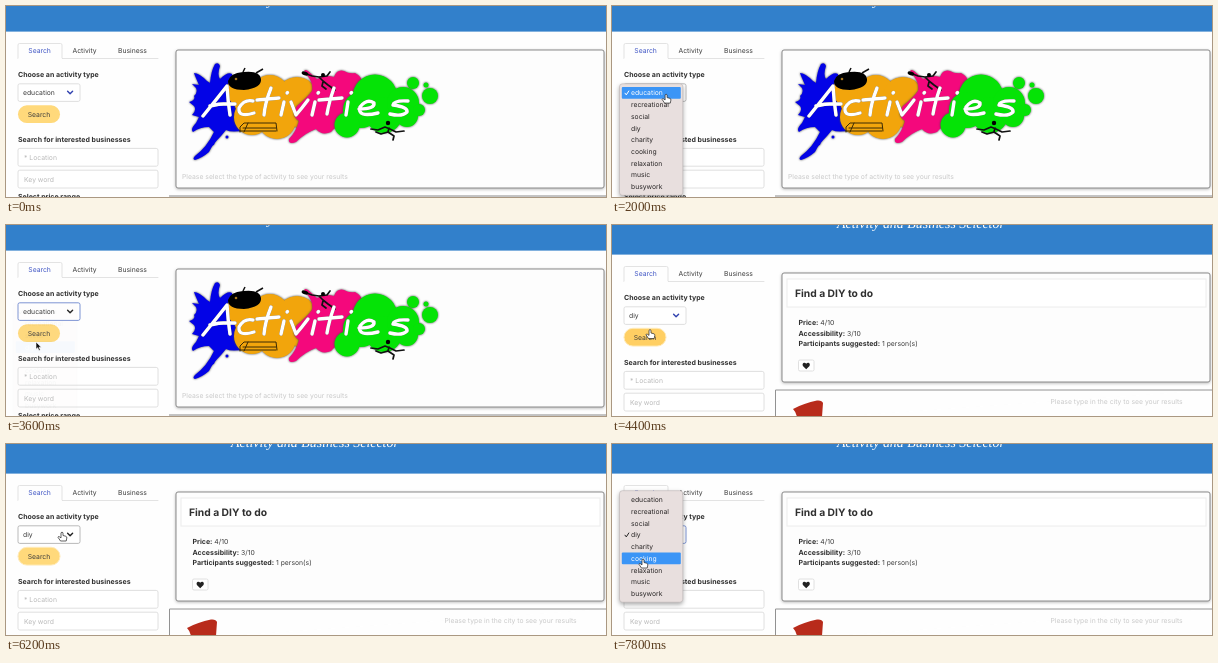
Recreate the animation shown at these times as an HTML page. Size 600 px wide and 191 px high, loop 8000 ms.

```html
<!DOCTYPE html>
<html lang="en">
<head>
<meta charset="utf-8">
<title>Activity and Business Selector</title>
<style>
  html, body { margin: 0; width: 100%; height: 100%; overflow: hidden; background: #fefefe; }
  svg { display: block; width: 600px; height: 191px; }
  text { font: 6.8px Inter, Roboto, sans-serif; fill: #3c3c3c; text-rendering: geometricPrecision; white-space: pre; }
  .bold { font-weight: 700; font-size: 7px; fill: #303030; }
  .title { font-weight: 700; font-size: 10.3px; fill: #303030; }
  .banner { font: italic 13.9px "Liberation Serif", serif; fill: #fff; }
  .hint { fill: #c9c9c9; }
  .placeholder { fill: #b9b9b9; }
  .field { fill: #fff; stroke: #d8d8d8; stroke-width: .8; }
  .card { fill: #fdfdfd; stroke: #8b8b8b; filter: drop-shadow(0 1px 1.5px #0004); }
  .line { fill: none; stroke-linecap: round; stroke-linejoin: round; }
  .blob { filter: drop-shadow(0 0 .8px #444); }
</style>
</head>
<body>
<svg viewBox="0 0 600 191">
  <g id="page">
    <rect y="-10" width="600" height="35.600" fill="#3280cb"/>
    <text class="banner" x="225" y="-.8">Activity and Business Selector</text>

    <path class="line" d="M12 52.5V39q0-1.5 1.5-1.5h41q1.5 0 1.5 1.5v13.5H152" stroke="#dcdcdc" stroke-width=".8"/>
    <path d="M12.5 52.5h43" stroke="#fefefe"/>
    <text x="22.3" y="47" style="fill:#3f55c4">Search</text>
    <text x="66.5" y="47">Activity</text>
    <text x="112" y="47">Business</text>

    <text class="bold" x="12" y="71">Choose an activity type</text>
    <rect id="select" class="field" x="12" y="77.8" width="62" height="17.6" rx="1.8"/>
    <text id="choice" x="17" y="89"></text>
    <path id="chevron" class="line" d="m61.6 85.2 2.5 2.6 2.5-2.6" stroke-width="1.4"/>
    <rect id="button" x="12" y="99.3" width="42" height="17.8" rx="8.9"/>
    <text x="33" y="110.7" text-anchor="middle">Search</text>

    <text class="bold" x="12" y="136">Search for interested businesses</text>
    <rect class="field" x="12" y="142.4" width="140" height="17.8" rx="1.8"/>
    <text class="placeholder" x="18" y="154">* Location</text>
    <rect class="field" x="12" y="164.2" width="140" height="17.8" rx="1.8"/>
    <text class="placeholder" x="18" y="175.8">Key word</text>
    <text class="bold" x="12" y="193">Select price range</text>

    <g id="welcome">
      <rect class="card" x="170" y="44" width="428" height="138" rx="2"/>
      <path d="M163 190H600" stroke="#888"/>
      <g class="blob" fill="#0303e6">
        <path d="M190 82L186 78L193 79Q189 70 188 67Q193 67 201 75L204 77Q205 65 209 58Q213 56 214 60Q211 69 214 73Q222 65 226 68Q226 75 232 78L246 96L240 124Q226 127 220 124L215 130Q206 139 203 146Q196 152 189 154Q186 153 189 150Q201 141 208 126L203 121Q194 121 187 126Q184 123 190 117L193 111L186 109Q191 104 188 100L183 96Q190 94 188 90Q192 87 190 82Z"/>
        <circle cx="206" cy="137" r="2.500"/><circle cx="221" cy="131" r="1.500"/>
      </g>
      <g class="blob" fill="#f2a50c">
        <circle cx="238" cy="85" r="17"/><circle cx="264" cy="88" r="19"/>
        <circle cx="291" cy="91" r="20"/><circle cx="300" cy="105" r="19"/>
        <circle cx="246" cy="111" r="18"/><circle cx="271" cy="114" r="19"/>
        <path d="M224 88h80v25h-70Z"/>
      </g>
      <path class="blob" fill="#f4087c" d="M299 67Q297 62 302 65L311 73Q319 68 328 71Q331 63 338 65Q343 68 349 67Q359 72 355 82Q365 92 355 105Q357 120 343 121Q332 117 325 126Q316 130 310 123Q299 127 290 136Q282 139 283 133Q290 126 293 115Q284 109 291 100Q301 92 306 85Q308 76 299 67Z"/>
      <g class="blob" fill="#05e306">
        <circle cx="369" cy="91" r="22.500"/><circle cx="355" cy="104" r="18"/>
        <circle cx="341" cy="119" r="12.500"/><circle cx="378" cy="109" r="18"/>
        <circle cx="397" cy="97" r="16"/><circle cx="401" cy="110" r="11"/>
        <circle cx="407" cy="77" r="6"/><circle cx="424" cy="90" r="8"/>
        <circle cx="413" cy="104" r="6"/><circle cx="420" cy="79" r="2.500"/>
      </g>
      <g id="silhouettes">
        <path d="M222 75Q224 67 237 66Q254 64 255 73Q256 82 238 84Q222 84 222 75Z"/>
        <path d="m250 67 7-4M237 66l2-4" stroke="#111" stroke-width="1.500"/>
        <circle cx="230" cy="73" r="1.300" fill="#a67620"/>
        <path class="line" d="m298 67 8 3 7 1 4 4 5 4 7 5m-12-8-1 4 4 3m-7-12 8-1 3-4" stroke="#111" stroke-width="1.700"/>
        <ellipse cx="299" cy="67.500" rx="3.500" ry="1.800" transform="rotate(18 299 67.5)"/>
        <circle cx="317" cy="69" r="2"/>
        <path class="line" d="m365 123 7 1 7-3 5 2 6 3 8-1m-15-3-1 4 6 4-1 4m-5-8-7 2-5-2" stroke="#111" stroke-width="1.700"/>
        <circle cx="382" cy="117" r="2.200"/>
        <path class="line" d="M234 126v-5l4-4h32l1 8m-37 0h36m-33-3h33m-28-5-4 9" stroke="#3b2a05"/>
      </g>
      <g class="line" aria-label="Activities" stroke="#fff" stroke-width="3.400" style="filter:drop-shadow(0 0 .5px #555)">
        <path d="M197 110Q210 94 221 80Q222 96 224 109M204 100Q215 97 229 98"/>
        <path d="M247 95Q238 93 233 102Q232 112 248 107"/>
        <path d="M265 82Q259 97 258 109M251 94L273 92"/>
        <path d="M278 96L275 109M281 87l.5-.5"/>
        <path d="M285 96L290 109Q296 102 302 94"/>
        <path d="M309 96L306 109M312 87l.5-.5"/>
        <path d="M328 82Q323 96 321 108M313 94L336 92"/>
        <path d="M342 96L340 109M345 87l.5-.5"/>
        <path d="M353 103Q369 103 368 97Q361 92 354 101Q351 112 372 107"/>
        <path d="M402 95Q388 94 387 99Q402 101 401 106Q396 111 384 108"/>
      </g>
      <text class="hint" x="176" y="173">Please select the type of activity to see your results</text>
    </g>

    <g id="result">
      <rect class="card" x="170" y="44" width="428" height="109" rx="2"/>
      <rect x="175" y="50" width="419" height="28" fill="#fff" stroke="#ececec"/>
      <text class="title" x="183" y="67.600">Find a DIY to do</text>
      <text x="186.500" y="96"><tspan class="bold">Price:</tspan> 4/10</text>
      <text x="186.500" y="106.700"><tspan class="bold">Accessibility:</tspan> 3/10</text>
      <text x="186.500" y="117.400"><tspan class="bold">Participants suggested:</tspan> 1 person(s)</text>
      <rect class="field" x="186.500" y="131" width="15.500" height="11" rx="1.500"/>
      <path d="M194.200 140.300l-3.300-3.400q-1-2.500 1-3.200 1.500-.2 2.300 1.100.8-1.300 2.300-1.100 2 .7 1 3.200Z" fill="#222"/>
      <path d="M163.500 192v-31H600" fill="#fefefe" stroke="#929292"/>
      <text class="hint" x="438.500" y="174.500">Please type in the city to see your results</text>
      <path d="M181 180Q192 174 205 171.500Q210 171 211 174L210 188H185Q184 183 181 180Z" fill="#b82b1b"/>
    </g>
  </g>

  <g id="menu">
    <rect x="7.500" width="63.300" height="111.500" rx="3" fill="#e8dfde" stroke="#bdb5b5" stroke-width=".6" style="filter:drop-shadow(0 2px 2px #0005)"/>
    <rect id="highlight" x="9.800" width="59" height="11.700" rx="1" fill="#3b95f6"/>
    <path id="check" class="line" d="m13 0 1.300 1.700 2.500-3.900" stroke-width="1"/>
    <g id="items"></g>
  </g>

  <path id="arrow" d="M0 0v7.200l1.700-1.500 1.300 2.800 1.300-.6-1.300-2.700h2.300Z" fill="#111" stroke="#fff" stroke-width=".6"/>
  <path id="hand" d="M-1 .8Q0-.7 1 .8V3.500l3 .8q1 .4.800 1.700l-.6 3H-1.500L-4 5.300q.2-1.300 1.500-.5l1.500 1.100Z" fill="#fff" stroke="#222" stroke-width=".7" stroke-linejoin="round"/>
</svg>
<script>
const LOOP = 8000, STEP = 200, ROW = 11.7;
const activities = ["education", "recreational", "social", "diy", "charity", "cooking", "relaxation", "music", "busywork"];
const el = id => document.getElementById(id);
const set = (id, attrs) => Object.entries(attrs).forEach(([key, value]) => el(id).setAttribute(key, value));
const show = (id, visible) => { el(id).style.display = visible ? "" : "none"; };

// time, x, y of the pointer tip
const pointerPath = [
  [400, 76, 154], [1000, 55, 124], [1600, 58, 87], [1800, 58, 87], [2600, 33, 94],
  [3200, 31, 120], [3600, 30, 117], [4000, 38, 104.5], [5000, 38, 104.5],
  [6200, 56, 88], [6600, 56, 88], [7800, 31, 115]
];

const labels = activities.map((name, i) => {
  const label = document.createElementNS("http://www.w3.org/2000/svg", "text");
  label.textContent = name;
  label.setAttribute("x", 19);
  label.setAttribute("y", 11.7 + i * ROW);
  el("items").append(label);
  return label;
});

function pointerAt(t) {
  const next = pointerPath.findIndex(point => point[0] >= t);
  if (next < 1) return pointerPath[next < 0 ? pointerPath.length - 1 : 0].slice(1);
  const [t0, x0, y0] = pointerPath[next - 1], [t1, x1, y1] = pointerPath[next];
  const u = (t - t0) / (t1 - t0), ease = u * u * (3 - 2 * u);
  return [x0 + (x1 - x0) * ease, y0 + (y1 - y0) * ease];
}

function draw(t) {
  const searched = t >= 4200, shift = searched ? 4 : 0;
  const chosen = t >= 3800 ? 3 : 0;
  const open = (t >= 1800 && t < 3600) || t >= 6600;
  const closing = t === 3600;
  const [x, y] = pointerAt(t);

  set("page", { transform: `translate(0 ${shift})` });
  show("welcome", !searched);
  show("result", searched);
  el("choice").textContent = activities[chosen];

  const focused = closing || t === 3800 || t >= 6600;
  const hovered = (t >= 1400 && t < 3600) || (t >= 5800 && t < 6600);
  el("select").style.stroke = focused ? "#5c79c9" : hovered ? "#a9a9a9" : "#d8d8d8";
  set("chevron", { stroke: focused || hovered ? "#222" : "#3344b0" });
  const onButton = t >= 4000 && t < 5400;
  set("button", { fill: onButton ? "#ffcf63" : "#ffd97b", stroke: t >= 4000 && t < 6600 ? "#ffebba" : "none" });

  show("menu", open || closing);
  if (open || closing) {
    const top = 77.8 + shift - chosen * ROW;
    const row = t <= 2600 ? 0 : Math.max(0, Math.min(8, Math.floor((y - top - 3.3) / ROW)));
    const active = closing ? 3 : row;
    set("menu", { transform: `translate(0 ${top})`, opacity: closing ? .035 : 1 });
    set("highlight", { y: 3.3 + active * ROW });
    set("check", { transform: `translate(0 ${9.4 + chosen * ROW})`, stroke: active === chosen ? "#fff" : "#222" });
    labels.forEach((label, i) => { label.style.fill = i === active ? "#fff" : "#282525"; });
  }

  const pointing = (t >= 1400 && t < 3600) || (t >= 4000 && t < 5200) || t >= 5800;
  show("hand", pointing);
  show("arrow", t >= 400 && !pointing);
  set(pointing ? "hand" : "arrow", { transform: `translate(${x} ${y})` });
}

const start = performance.now();
function tick() {
  const t = (performance.now() - start) % LOOP;
  draw(Math.floor(t / STEP) * STEP);
  requestAnimationFrame(tick);
}
tick();
</script>
</body>
</html>
```
